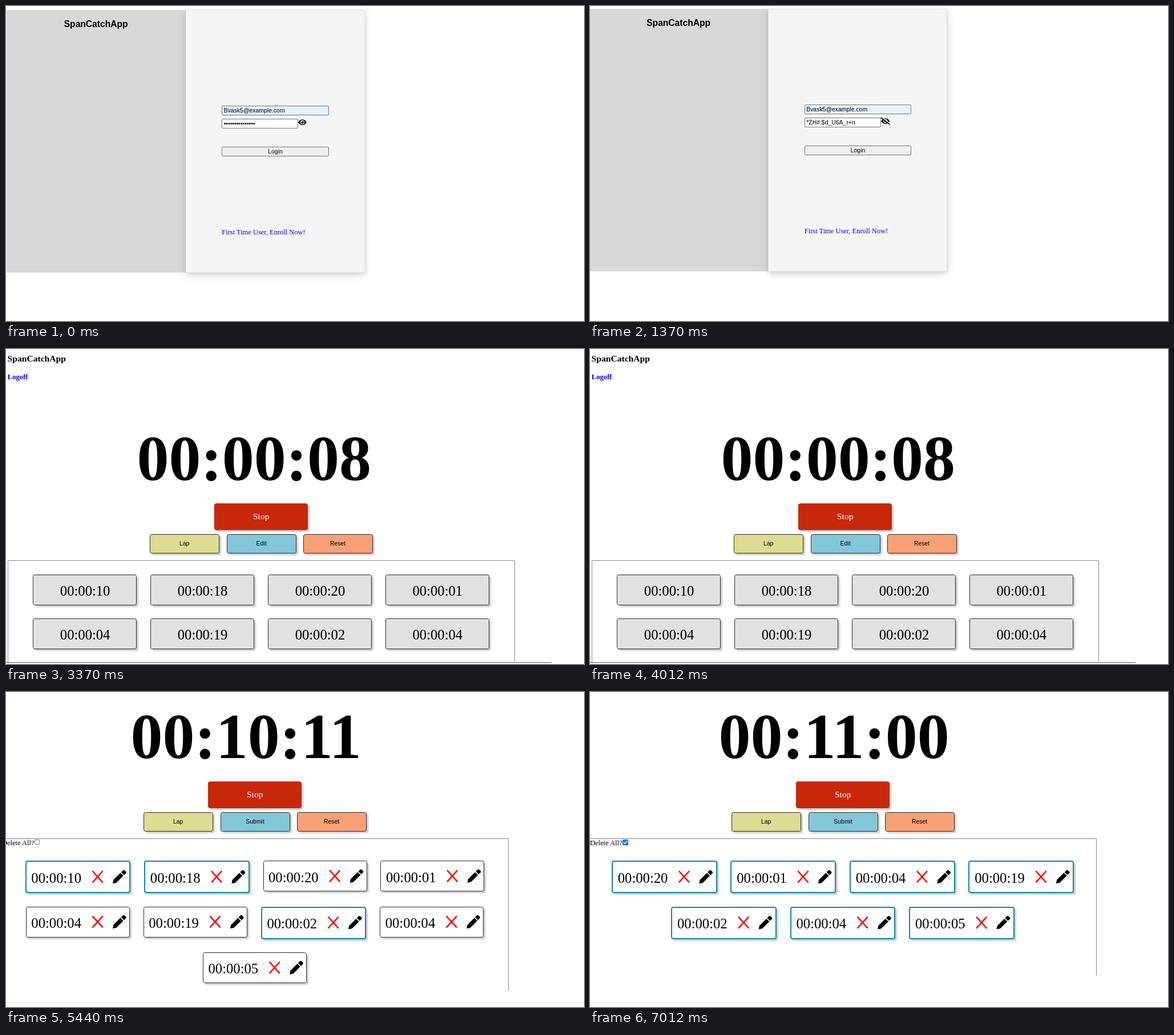
Recreate the animation shown at these times as an HTML page. Size 1013 by 553 pixels, loop 7.44 s.

```html
<!DOCTYPE html>
<html lang="en">
<head>
<meta charset="utf-8">
<title>Stopwatch demo</title>
<style>
html, body { margin: 0; height: 100%; overflow: hidden; background: #fff; }
svg { display: block; width: 100%; height: 100%; }
text { white-space: pre; }
.serif { font-family: "Liberation Serif", "Times New Roman", serif; }
.sans { font-family: "Liberation Sans", Arial, sans-serif; }
.bold { font-weight: bold; }
.mid { text-anchor: middle; }
.raised { filter: drop-shadow(3px 3px 1px #0003); }
.panel { filter: drop-shadow(0 3px 4px #0000001c) drop-shadow(0 4px 8px #0000001a); }
</style>
</head>
<body>
<svg id="stage" viewBox="0 0 1013 553"></svg>
<script>
const APP = 'SpanCatchApp';
const BODY = 10.45, LARGE = 12.48, TITLE = 15.6, LAP = 24.65, CLOCK = 112;
const EDGE = '#2a2a2a';

const text = (x, y, size, str, cls = 'serif', fill = '#000') =>
  `<text x="${x}" y="${y}" font-size="${size}" class="${cls}" fill="${fill}">${str}</text>`;

// Box snapped to whole pixels, with its border drawn inside.
function box(x, y, w, h, fill, { border = 'none', line = 1, r = 0, cls = '' } = {}) {
  const inset = border === 'none' ? 0 : line;
  const left = Math.floor(x), top = Math.floor(y);
  const width = Math.floor(x + w) - left - inset, height = Math.floor(y + h) - top - inset;
  return `<rect x="${left + inset / 2}" y="${top + inset / 2}" width="${width}" height="${height}"
    rx="${r}" fill="${fill}" stroke="${border}" stroke-width="${line}" class="${cls}"/>`;
}

const path = (d, stroke, width = 1, extra = '') =>
  `<path d="${d}" fill="none" stroke="${stroke}" stroke-width="${width}" ${extra}/>`;

function eye(x, y, crossed) {
  const slash = crossed
    ? path('M45 -25L660 455', '#f5f5f5', 60) + path('M24 24L616 488', '#000', 60, 'stroke-linecap="round"')
    : '';
  return `<g transform="translate(${x} ${y}) scale(.0252)">
    <g transform="translate(${crossed ? 32 : 0} 0)">
      <path d="M3 241C58 136 165 64 288 64S518 136 573 241q7 15 0 30C518 376 411 448 288 448S58 376 3 271q-7-15 0-30Z"/>
      <circle cx="288" cy="256" r="144" fill="#f5f5f5"/>
      <circle cx="288" cy="256" r="96"/>
      <circle cx="240" cy="208" r="46" fill="#f5f5f5"/>
    </g>${slash}</g>`;
}

function login({ ox = 0, oy = 0, revealed }) {
  const field = { border: '#767676', r: 1.5 };
  const x = 378.5 + ox;
  return box(1 + ox, 7 + oy, 314.4, 461, '#d8d8d8')
    + box(315.4 + ox, 7 + oy, 314, 461, '#f5f5f5', { border: '#e6e6e6', cls: 'panel' })
    + text(157.6 + ox, 36.6 + oy, TITLE, APP, 'sans bold mid')
    + box(x, 175 + oy, 187.5, 17, '#e8f0fe', field)
    + text(x + 3.2, 187 + oy, BODY, 'Bvask5@example.com', 'sans')
    + box(x, 198 + oy, 134, 17.6, '#fff', field)
    + text(x + 3.2, 210.2 + oy, BODY, revealed ? '*ZH#:$d_U6A_r+n' : '•'.repeat(15), 'sans')
    + eye(512.2 + ox, 197.6 + oy, revealed)
    + box(x, 247 + oy, 187.5, 17, '#efefef', field)
    + text(472 + ox, 259.2 + oy, BODY, 'Login', 'sans mid')
    + text(x - .2, 401.4 + oy, 12.44, 'First Time User, Enroll Now!', 'serif', '#00f');
}

function lapCard(x, y, w, h, lap, editing, selected) {
  const grow = selected ? 1.3 : 0;
  const style = { border: selected ? '#0d87ad' : EDGE, line: selected ? 2 : 1, r: 3, cls: 'raised' };
  const base = y + 36.9 + grow;
  const card = box(x, y, w, h, editing ? '#fff' : '#e1e1e1', style);
  if (!editing) return card + text(x + w / 2, base, LAP, lap, 'serif mid');
  return card + text(x + 9 + grow, base, LAP, lap)
    + `<g transform="translate(${x + grow} ${y + grow})">`
    + path('M116.8 17L133.6 35.6M133.6 17L116.8 35.6', '#f00', 2.6, 'stroke-linecap="round"')
    + `<path transform="translate(151.6 14.2)"
        d="M0 24L1.3 17.6L13.6 5.3L18.7 10.4L6.4 22.7ZM14.8 4.1L18 1q1.4-1.4 2.8 0L23.2 3.2q1.4 1.4 0 2.8L19.9 9.2Z"/></g>`;
}

// Rows of up to four cards, centred, each row as tall as its tallest card.
function lapGrid(center, y, laps, editing, selected) {
  const gapX = 23.9, gapY = 23.5;
  let out = '';
  for (let start = 0; start < laps.length; start += 4) {
    const row = laps.slice(start, start + 4).map((seconds, i) => {
      const on = selected.includes(start + i);
      return { seconds, on, w: on ? 184.6 : 182, h: on ? 56.9 : 54 };
    });
    let x = center - (row.reduce((sum, c) => sum + c.w, 0) + gapX * (row.length - 1)) / 2;
    for (const c of row) {
      out += lapCard(x, y, c.w, c.h, '00:00:' + String(c.seconds).padStart(2, '0'), editing, c.on);
      x += c.w + gapX;
    }
    y += Math.max(...row.map(c => c.h)) + gapY;
  }
  return out;
}

function checkbox(x, y, checked) {
  return checked
    ? box(x, y, 10, 10, '#0075ff', { r: 1.5 }) + path(`M${x + 2} ${y + 5}l2.2 2.3l4-5`, '#fff', 1.5)
    : box(x, y, 9, 9, '#fff', { border: '#767676', r: 1.5 });
}

function watch({ ox = 0, oy = 0, time, running = true, editing = false, laps, selected = [],
                 checked = false, bottom = 560, rule = '' }) {
  const button = (x, label, fill) =>
    box(x + ox, 331 + oy, 122, 34, fill, { border: EDGE, r: 3, cls: 'raised' })
    + text(x + 60.6 + ox, 350.8 + oy, BODY, label, 'sans mid');
  const left = Math.floor(2 + ox) + .5, right = Math.floor(890.2 + ox) + .5;
  const top = Math.floor(377.8 + oy) + .5;
  const header = editing ? '' :
    text(1.6 + ox, 27.6 + oy, TITLE, APP, 'serif bold')
    + text(1.8 + ox, 58.8 + oy, 12.6, 'Logoff', 'serif bold', '#00f');
  const deleteAll = editing
    ? text(3 + ox, top + 11.2, LARGE, 'Delete All?') + checkbox(60 + ox, top + 1.5, checked)
    : '';
  return header
    + text(228.4 + ox, 236.4 + oy, CLOCK, time, 'serif bold')
    + box(364 + ox, 277 + oy, 164.6, 47.4, running ? '#c8270a' : '#22c055',
        { border: running ? '#c8270a' : '#5c8a68', r: 3, cls: 'raised' })
    + text(446.2 + ox, 305.4 + oy, TITLE, running ? 'Stop' : 'Start', 'serif mid', running ? '#fff' : '#000')
    + button(251, 'Lap', '#dcdc92')
    + button(386, editing ? 'Submit' : 'Edit', '#82c7d9')
    + button(520, 'Reset', '#f9a176')
    + path(`M${left} ${bottom}V${top}H${right}V${bottom}`, '#888')
    + deleteAll
    + lapGrid(446.5 + ox, 377.5 + oy + (editing ? 39.2 : 24.5), laps, editing, selected)
    + rule;
}

const laps = [10, 18, 20, 1, 4, 19, 2, 4, 5];
const scenes = [
  [1370, login({ revealed: false })],
  [2340, login({ ox: -2.5, oy: -2, revealed: true })],
  [3370, watch({ time: '00:00:00', running: false, laps: laps.slice(0, 8) })],
  [4440, watch({ ox: 1, oy: -6, time: '00:00:08', laps: laps.slice(0, 8), bottom: 550,
    rule: path('M0 550.5H956', '#555') })],
  [5440, watch({ ox: -6.5, oy: -129.7, time: '00:09:25', editing: true, laps, bottom: 540,
    rule: path('M2 541H889', '#111', 2) })],
  [6370, watch({ ox: -10, oy: -120, time: '00:10:11', editing: true, laps, selected: [0, 1, 6], bottom: 524 })],
  [7440, watch({ ox: -3, oy: -120, time: '00:11:00', editing: true, laps: laps.slice(2),
    selected: [0, 1, 2, 3, 4, 5, 6], checked: true, bottom: 497 })]
];

const stage = document.getElementById('stage');
const begin = performance.now();
let shown;

function draw() {
  const t = (performance.now() - begin) % 7440;
  const scene = scenes.find(([end]) => t < end);
  if (scene !== shown) {
    stage.innerHTML = scene[1];
    shown = scene;
  }
  requestAnimationFrame(draw);
}
draw();
</script>
</body>
</html>
```
